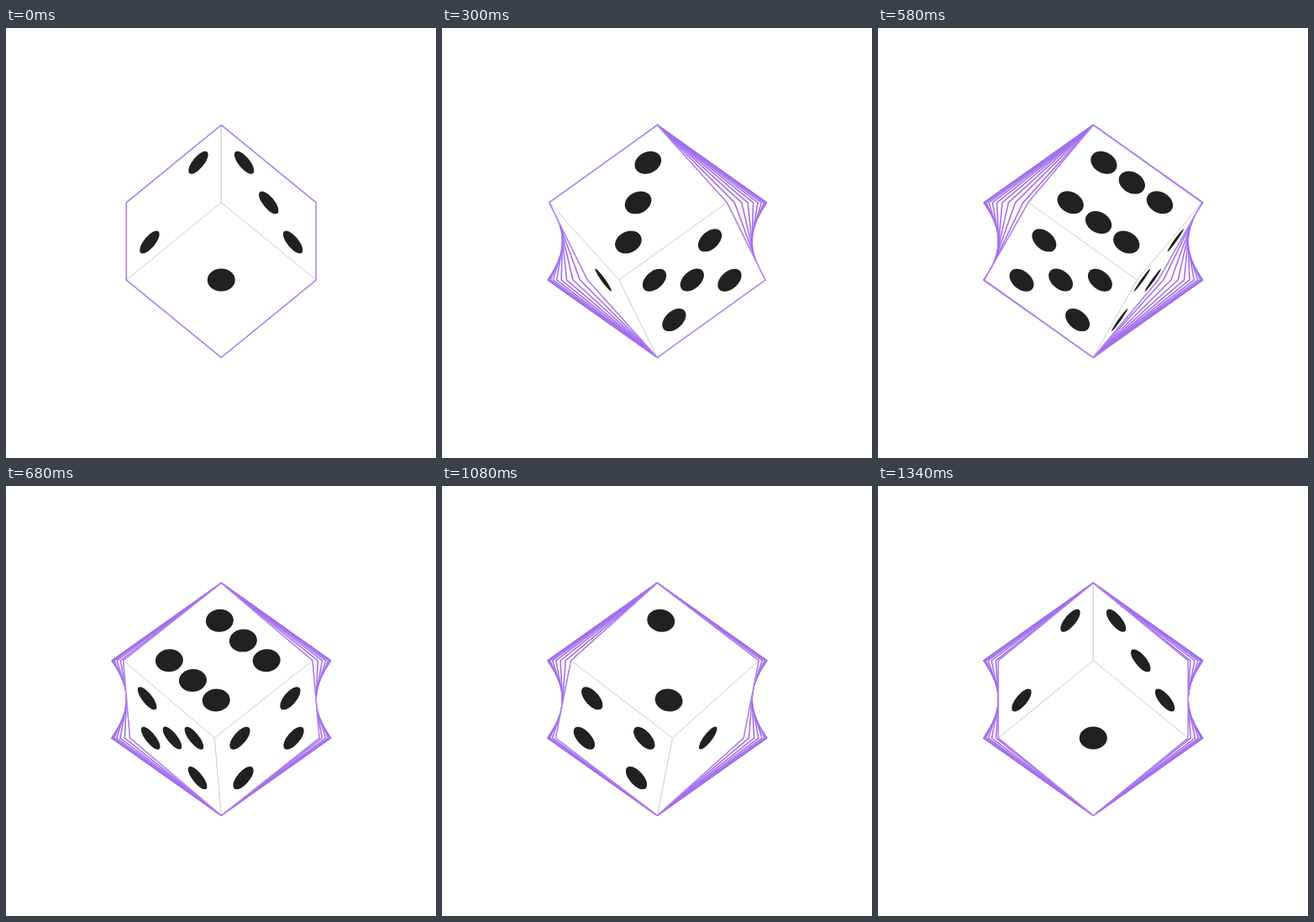
An HTML page that plays this animation: 512 by 512 pixels, repeating every 1360 ms.

```html
<!DOCTYPE html>
<html lang="en">
<head>
<meta charset="utf-8">
<title>Spinning die</title>
<style>
  html, body { margin: 0; width: 100%; height: 100%; overflow: hidden; background: #fff; }
  svg { display: block; width: 100vw; height: 100vh; }
  .hull { fill: #fff; stroke: #a26fec; stroke-width: 1.6; stroke-linejoin: round; }
  .rim { fill: none; stroke: #b183f0; stroke-width: 1.4; }
  .face { fill: #fff; stroke: #cfcfd3; stroke-width: .9; vector-effect: non-scaling-stroke; }
  .pip { fill: #212122; }
</style>
</head>
<body>
<svg viewBox="0 0 512 512">
  <g id="trail"></g>
  <g id="die"></g>
</svg>
<script>
const LOOP = 1360, STEP = 20, COUNT = LOOP / STEP;
const CX = 256.3, TOP = 115.7, BOTTOM = 392.2;
const RISE = (BOTTOM - TOP) / 3;      // height between vertex rings
const R = RISE * Math.SQRT2;          // ring radius of a cube standing on a corner
const LO = 0.242, MID = 0.5, HI = 0.756, PIP = 0.1035;

const pips = {
  1: [[MID, MID]],
  2: [[LO, LO], [HI, HI]],
  3: [[LO, LO], [MID, MID], [HI, HI]],
  4: [[LO, LO], [LO, HI], [HI, LO], [HI, HI]],
  6: [LO, HI].flatMap(s => [LO, MID, HI].map(t => [s, t]))
};
pips[5] = [...pips[4], [MID, MID]];

// Each face: value, heading in degrees, touching the top or bottom corner
const faces = [
  [2, -60, true], [3, 60, true], [6, 180, true],
  [1, 0, false], [5, 120, false], [4, 240, false]
].map(([value, heading, upper]) => ({ value, heading, upper }));

const trail = document.getElementById("trail");
const die = document.getElementById("die");
const rad = deg => deg * Math.PI / 180;
const ringX = deg => R * Math.sin(rad(deg));

function add(parent, tag, attrs = {}) {
  const el = document.createElementNS("http://www.w3.org/2000/svg", tag);
  for (const key in attrs) el.setAttribute(key, attrs[key]);
  return parent.appendChild(el);
}

// The die rotates about its vertical body diagonal
const turnAt = t => Math.min(360, Math.max(0, 0.2712 * t - 0.9));

function hull(turn) {
  const ring = start => [0, 120, 240].map(a => CX + ringX(start + a - turn));
  const up = ring(0), down = ring(60);
  const y1 = TOP + RISE, y2 = BOTTOM - RISE;
  return [
    [CX, TOP], [Math.max(...up), y1], [Math.max(...down), y2],
    [CX, BOTTOM], [Math.min(...down), y2], [Math.min(...up), y1]
  ].map(p => p.map(v => v.toFixed(2)).join()).join(" ");
}

const hulls = Array.from({ length: COUNT }, (_, i) =>
  add(trail, "polygon", { class: "hull", points: hull(turnAt(i * STEP)) }));

for (const face of faces) {
  face.node = add(die, "g");
  add(face.node, "rect", { class: "face", width: 1, height: 1 });
  for (const [cx, cy] of pips[face.value])
    add(face.node, "circle", { class: "pip", cx, cy, r: PIP });
}
const rim = add(die, "polygon", { class: "hull rim" });

function draw(time) {
  const step = Math.floor((time % LOOP) / STEP);
  const turn = turnAt(step * STEP);
  hulls.forEach((h, i) => h.style.display = i <= step ? "" : "none");
  for (const { node, heading, upper } of faces) {
    const a = heading - turn;
    node.style.display = Math.cos(rad(a)) > 0.001 ? "" : "none";
    const dy = upper ? RISE : -RISE;
    const m = [ringX(a - 60), dy, ringX(a + 60), dy, CX, upper ? TOP : BOTTOM];
    node.setAttribute("transform", `matrix(${m.map(v => v.toFixed(4)).join()})`);
  }
  rim.setAttribute("points", hull(turn));
}

function tick() {
  draw(performance.now());
  requestAnimationFrame(tick);
}
tick();
</script>
</body>
</html>
```
